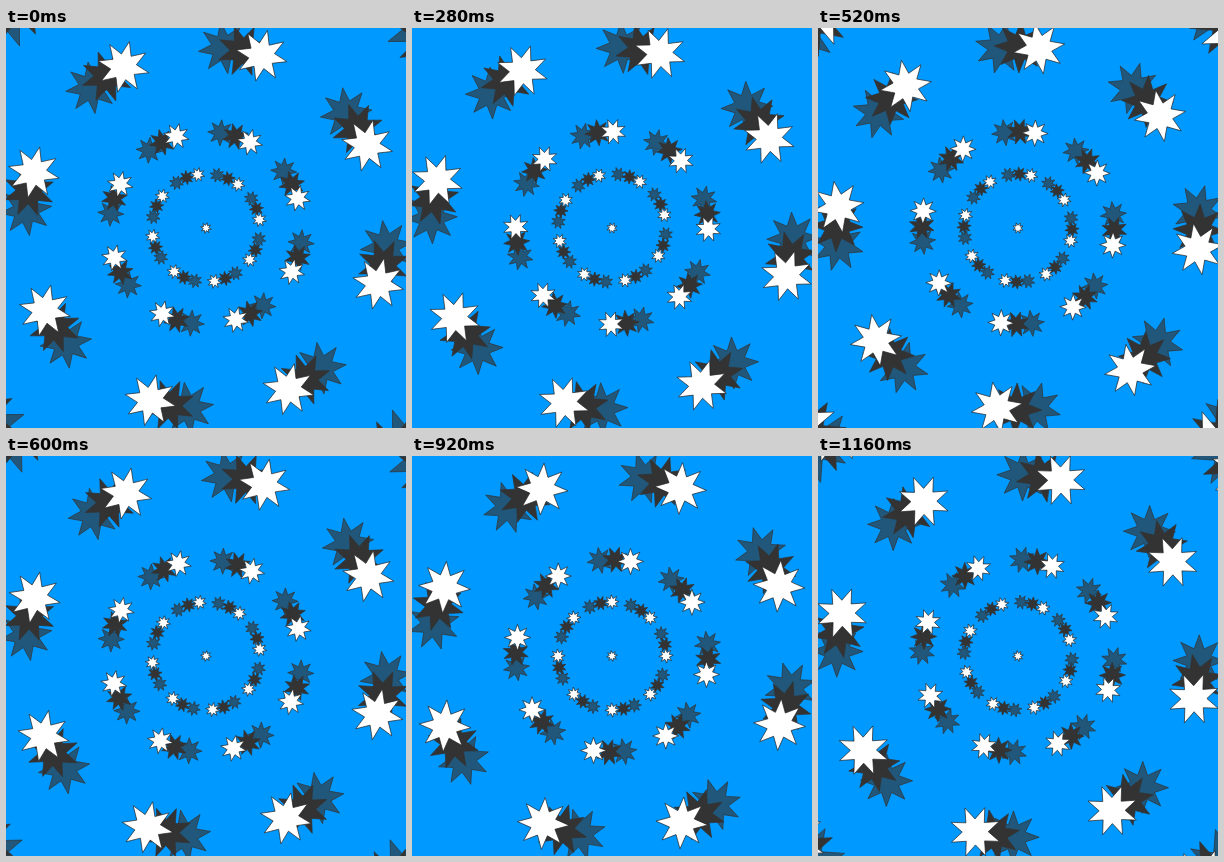
Recreate the animation shown at these times as an HTML page with a canvas. Size 400 px wide and 400 px high, loop 1.2 s.

```html
<!DOCTYPE html>
<html lang="en">
<head>
<meta charset="utf-8">
<title>Star rings</title>
<style>
  html, body { margin: 0; width: 100%; height: 100%; overflow: hidden; background: #09f; }
  canvas { display: block; width: 400px; height: 400px; }
</style>
</head>
<body>
<canvas id="stage" width="400" height="400"></canvas>
<script>
const ctx = document.getElementById('stage').getContext('2d');
const LOOP = 1200, STEP = 40, CENTER = 200, POINTS = 8;
const TURN = 100 / 33; // degrees per step for the slowest ring
const rad = deg => deg * Math.PI / 180;

// Inner to outer: distance from the centre, star size
const rings = [
  { dist: 54, size: 7.2 },
  { dist: 96.3, size: 13.1 },
  { dist: 181, size: 26 },
  { dist: 298, size: 41 }
];

// Oldest echo first, the bright star last
const layers = [
  { lag: 2, fill: '#21577a', line: '#333' },
  { lag: 1, fill: '#333', line: '#333' },
  { lag: 0, fill: '#fff', line: '#222' }
];

const ringSpeed = index => TURN * (4 - index);
// Each star spins against its ring, twice as fast
const tiltAt = (index, t) => 13 - 2 * ringSpeed(index) * t;

function star(x, y, size, tilt, layer) {
  ctx.beginPath();
  for (let i = 0; i < POINTS * 2; i++) {
    const a = rad(tilt + i * 180 / POINTS);
    const r = i % 2 ? size * 0.5 : size;
    ctx.lineTo(x + r * Math.cos(a), y + r * Math.sin(a));
  }
  ctx.closePath();
  ctx.fillStyle = layer.fill;
  ctx.fill();
  ctx.strokeStyle = layer.line;
  ctx.lineWidth = 0.7;
  ctx.stroke();
}

function drawRing({ dist, size }, index, step) {
  const start = 0.2 - 9.1 * (index + 1);
  for (const layer of layers) {
    const t = step - layer.lag;
    for (let i = 0; i < 8; i++) {
      const a = rad(start + ringSpeed(index) * t + i * 45);
      star(CENTER + dist * Math.cos(a), CENTER + dist * Math.sin(a),
        size, tiltAt(index, t), layer);
    }
  }
}

function draw() {
  const step = Math.floor(performance.now() % LOOP / STEP);
  ctx.fillStyle = '#09f';
  ctx.fillRect(0, 0, 400, 400);
  rings.forEach((ring, i) => drawRing(ring, i, step));
  star(CENTER, CENTER, 5.4, tiltAt(-1, step), layers[2]);
  requestAnimationFrame(draw);
}
draw();
</script>
</body>
</html>
```
